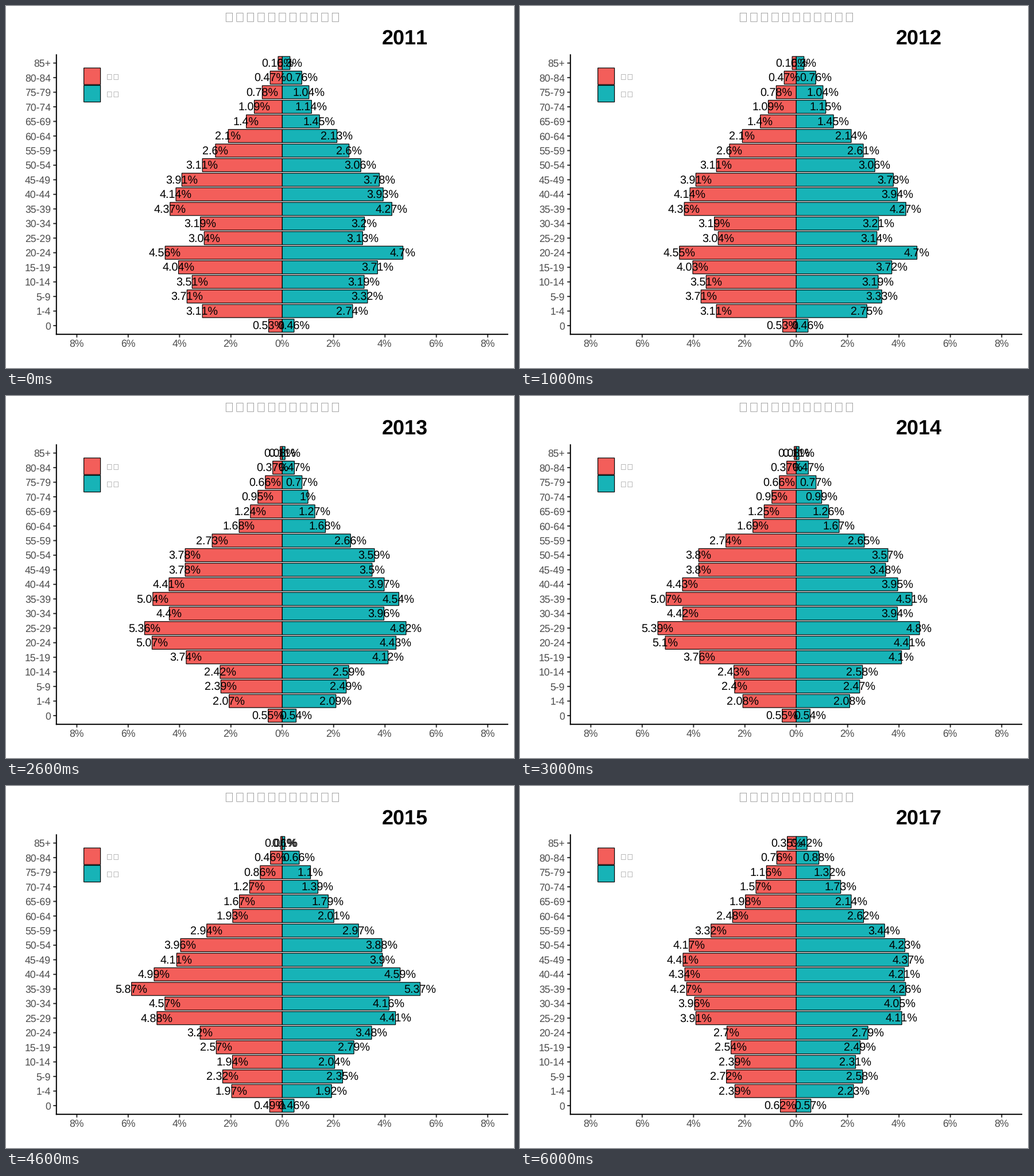
Write a matplotlib script that moves like this. It is 885 px wide and 632 px high and loops after 7000 ms.

```python
import matplotlib.pyplot as plt
import numpy as np
from matplotlib.animation import FuncAnimation
from matplotlib.patches import Rectangle

W, H, DPI = 885, 632, 100
PT = 72 / DPI  # points per pixel
LEFT, RIGHT, TOP, BOTTOM = 87.8, 875, 84.3, 573.2
ZERO, UNIT = 481.3, 44.74  # pixel of 0 % and pixels per percent
ROW_TOP, STEP = 99.6, 25.47
BAR_H = 0.9 * STEP
RED, TEAL = "#F35E5A", "#17B3B7"
INK, TICK, GREY = "#4D4D4D", "#333333", "#8C8C8C"

plt.rcParams.update({
    "font.family": "Liberation Sans",
    "text.hinting": "none",
    "text.kerning_factor": 6,
})

AGES = ["85+"] + [f"{a}-{a + 4}" for a in range(80, 4, -5)] + ["1-4", "0"]
ROWS = np.arange(len(AGES))

# Rows, oldest first, where the left outline and the right/left ratio bend.
BENDS = [0, 4, 5, 7, 8, 10, 11, 12, 13, 15, 16, 17, 18]
RATIO_BENDS = [0, 3, 9, 12, 13, 14, 18]


def pyramid(outline, ratio):
    """Left and right shares in percent, interpolated between the bends."""
    left = np.interp(ROWS, BENDS, outline)
    return np.array([left, left * np.interp(ROWS, RATIO_BENDS, ratio)])


def drift(pair, left, right):
    """The next year's pyramid: each side scaled by a factor."""
    return pair * np.array([left * np.ones(len(ROWS)), right * np.ones(len(ROWS))])


rural = pyramid(
    [.16, 1.4, 2.1, 3.11, 3.91, 4.37, 3.19, 3.04, 4.56, 3.51, 3.71, 3.11, .53],
    [1.9, 1.05, .95, 1.03, 1.03, .92, .87])
young = pyramid(
    [.08, 1.24, 1.68, 3.78, 3.78, 5.04, 4.4, 5.36, 5.07, 2.42, 2.39, 2.07, .55],
    [1.4, 1.05, .9, .9, .874, 1.1, .98])
peaked = pyramid(
    [.06, 1.67, 1.93, 3.96, 4.11, 5.87, 4.57, 4.88, 3.2, 1.94, 2.32, 1.97, .49],
    [1.6, 1.1, .92, .904, 1.088, 1.087, .94])
ageing = pyramid(
    [.35, 1.98, 2.48, 4.17, 4.41, 4.27, 3.96, 3.91, 2.7, 2.39, 2.72, 2.39, .62],
    [1.2, 1.1, .97, 1.05, 1.033, .98, .92])
off_middle = 0.98 + 0.005 * abs(ROWS - 10)  # middle ages shrink, the ends grow

FIRST_YEAR = 2011
pyramids = [rural, drift(rural, .9988, 1.0014),
            young, drift(young, 1.005, .995),
            peaked, drift(peaked, off_middle, off_middle),
            ageing]

fig = plt.figure(figsize=(W / DPI, H / DPI), dpi=DPI, facecolor="white")
ax = fig.add_axes([0, 0, 1, 1])
ax.set_xlim(0, W)
ax.set_ylim(H, 0)
ax.axis("off")


def box(x, y, w, h, fill="none", edge="black", lw=1.2, z=2):
    return ax.add_patch(Rectangle((x, y), w, h, facecolor=fill, edgecolor=edge,
                                  linewidth=lw * PT, zorder=z, snap=False))


def line(xs, ys, color, lw=2.0, z=3):
    ax.plot(xs, ys, color=color, lw=lw * PT, solid_capstyle="butt",
            zorder=z, snap=False)


def text(x, y, s, size, color="black", ha="center", **kw):
    return ax.text(x, y, s, fontsize=size * PT, color=color, ha=ha,
                   va="baseline", zorder=5, **kw)


def empty_glyphs(x, y, n, pitch, w, h, lw):
    for i in range(n):
        box(x + i * pitch, y, w, h, edge=GREY, lw=lw)


# Axes
line([LEFT, LEFT], [TOP, BOTTOM + 1], "black")
line([LEFT - 1, RIGHT], [BOTTOM, BOTTOM], "black")
row_y = ROW_TOP + STEP * ROWS
for y, age in zip(row_y, AGES):
    line([LEFT - 5.5, LEFT], [y, y], TICK, z=2.5)
    text(78, y + 6.4, age, 17.6, INK, ha="right")
for p in range(-8, 9, 2):
    x = ZERO + p * UNIT
    line([x, x], [BOTTOM, BOTTOM + 5.5], TICK, z=2.5)
    text(x - 0.5, 594.6, f"{abs(p)}%", 17.6, INK)

# Heading and legend
empty_glyphs(383.3, 12.3, 11, 18.5, 11.3, 15, 0.8)
for y, color in ((108.2, RED), (138.6, TEAL)):
    box(135.6, y, 29, 29, color)
    empty_glyphs(176.5, y + 11.3, 2, 11.5, 7.5, 9, 0.6)

year_text = text(655, 67, "", 36, ha="left", fontweight="bold")
sides = []
for sign, color in ((-1, RED), (1, TEAL)):
    bars = [box(ZERO, y - BAR_H / 2, 0, BAR_H, color) for y in row_y]
    tags = [text(ZERO, y + 7.1, "", 19.8) for y in row_y]
    sides.append((sign, bars, tags))


def update(i):
    year_text.set_text(str(FIRST_YEAR + i))
    for (sign, bars, tags), values in zip(sides, pyramids[i].round(2)):
        for bar, tag, v in zip(bars, tags, values):
            bar.set_width(sign * v * UNIT)
            tag.set_text(f"{v:g}%")
            tag.set_x(ZERO + sign * v * UNIT - 0.5)
    return []


anim = FuncAnimation(fig, update, frames=len(pyramids), interval=1000,
                     init_func=lambda: update(0), repeat=True, repeat_delay=0)
plt.show()
```
